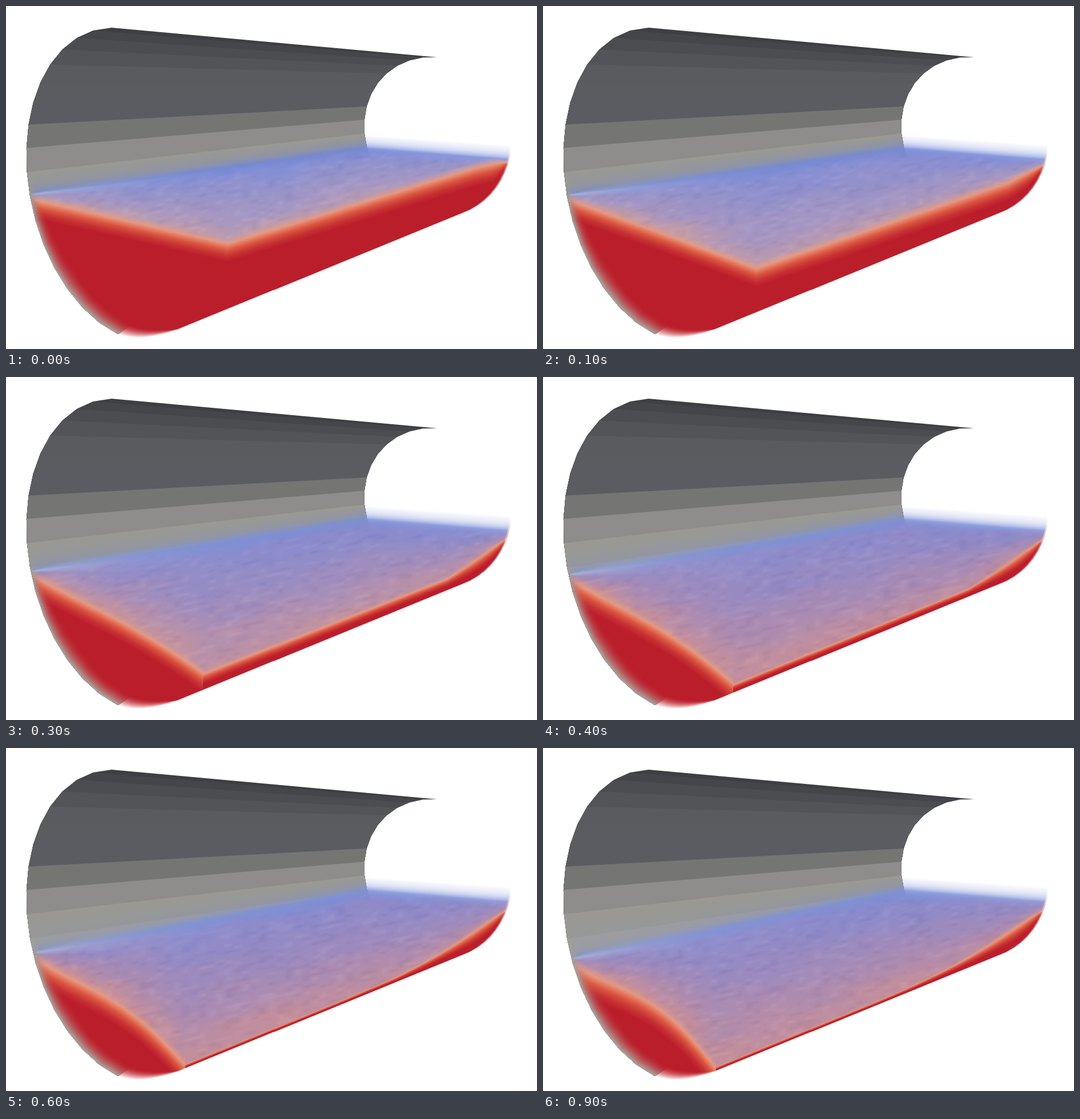
These frames come from a looping animation (930 px wide and 602 px high, 0.95 s). A matplotlib script:

```python
import numpy as np
import matplotlib.pyplot as plt
from matplotlib.animation import FuncAnimation
from matplotlib.colors import to_rgb
from matplotlib.path import Path

W, H, TOP = 930, 602, 220
FRAMES, STEP = 19, 50
FACETS = 17

X, Y = np.meshgrid(np.arange(W) + 0.5, np.arange(TOP, H) + 0.5)
x = X[0]


def ramp(value, stops, colors):
    rgb = np.array([to_rgb(c) for c in colors])
    return np.stack([np.interp(value, stops, rgb[:, i]) for i in range(3)], -1)


def smooth(v):
    v = np.clip(v, 0, 1)
    return v * v * (3 - 2 * v)


def lerp(a, b, w):
    return a + (b - a) * w


def mix(a, b, w):
    return lerp(a, b, w[..., None])


def half_circle(center, up, side, depth):
    """Corners of a half circle seen in perspective, from top to bottom."""
    a = np.linspace(0, np.pi, FACETS + 1)[:, None]
    arc = np.array(up) * np.cos(a) + np.array(side) * np.sin(a)
    return np.array(center) + arc / (1 + depth * np.sin(a))


def bezier(p, q, r):
    t = np.linspace(0, 1, 9)[:, None]
    p, q, r = map(np.array, (p, q, r))
    return p * (1 - t) ** 2 + 2 * q * t * (1 - t) + r * t ** 2


def noise(rng, a, b):
    """Smooth value noise in -1..1 at the grid coordinates a, b."""
    grid = rng.uniform(-1, 1, (128, 128))
    i, j = np.floor(a).astype(int), np.floor(b).astype(int)
    u, v = smooth(a - i), smooth(b - j)
    i0, i1, j0, j1 = i % 128, (i + 1) % 128, j % 128, (j + 1) % 128
    low = lerp(grid[i0, j0], grid[i1, j0], u)
    high = lerp(grid[i0, j1], grid[i1, j1], u)
    return lerp(low, high, v)


near = half_circle((190.5, 307), (-5.5, -269), (-181, -43), 0.17)
far = half_circle((756, 232), (-1, -142), (-139, -22), 0.08)

# Outer edge of the liquid: near rim, straight underside, far end
underside = np.vstack([bezier(near[-1], (235, 592), (300, 568)),
                       bezier((812, 358), (868, 330), (883, 262))])
edge = np.vstack([near[9:], underside, [(884, 244)]])
BOTTOM = np.interp(x, underside[:, 0], underside[:, 1])
HALO_TOP = np.interp(x, [36, 627, 884], [290, 226, 244])


def edge_distance():
    best = np.full(X.shape, 1e9)
    for (x0, y0), (x1, y1) in zip(edge, edge[1:]):
        dx, dy = x1 - x0, y1 - y0
        length = max(dx * dx + dy * dy, 1e-9)
        s = np.clip(((X - x0) * dx + (Y - y0) * dy) / length, 0, 1)
        best = np.minimum(best, np.hypot(X - x0 - s * dx, Y - y0 - s * dy))
    shape = Path(np.vstack([edge, [(627, 226)]]))
    inside = shape.contains_points(np.column_stack([X.ravel(), Y.ravel()]))
    return best * inside.reshape(X.shape)


FADE = np.interp(x, [40, 120, 200, 300, 800, 884], [14, 30, 28, 1.2, 1.2, 6])
EDGE_ALPHA = 1 - (1 - np.clip(edge_distance() / FADE, 0, 1)) ** 2


def front_line(s, cx):
    """Liquid level along the two cut faces, which meet at column cx."""
    late = smooth(s)
    cy = lerp(566, 420, (1 - s) ** 3)
    left, right = lerp(343, 382, late), lerp(280, 273, (1 - s) ** 6)
    kx = lerp(820, 635, late)
    ky = np.interp(kx, x, BOTTOM) - lerp(7, 66, (1 - s) ** 4)
    y = np.interp(x, [48, cx, kx, 882], [left, cy, ky, right])
    u = np.clip((x - 48) / (cx - 48), 0, 1)
    r = np.clip((x - kx) / (882 - kx), 0, 1)
    y += late * (9 * np.sin(np.pi * r) - 32 * np.sin(np.pi * u ** 1.4))
    return np.minimum(y, BOTTOM - 6)


def liquid(n):
    s = n / (FRAMES - 1)
    late = smooth(s)
    rng = np.random.default_rng(40 + n)
    cx = lerp(388, 303, np.sin(np.pi / 2 * s))
    front = front_line(s, cx)
    back = np.interp(x, [45, 627, 884], [lerp(330, 370, late), 249, 270])

    # Free surface
    tilt = Y + 0.22 * X
    broad = noise(rng, X / 80, tilt / 22)
    fine = noise(rng, X / 15, tilt / 6)
    v = (Y - back) / np.maximum(front - back, 8)
    shown = np.clip(v * 6, 0, 1)
    tone = np.clip(v, 0, 1) + 0.07 * broad * shown
    tone += 0.35 * np.exp(-np.maximum(X - 48, 0) / 170) * shown
    stops = [0, .12, .4, .7, 1]
    rgb = lerp(
        ramp(tone, stops, ["#6f86da", "#828dd5", "#9593ca", "#a597c3", "#bf9caa"]),
        ramp(tone, stops, ["#7b8fd9", "#8c8aca", "#978ac1", "#ab8bb1", "#c28e9c"]),
        smooth(2 * s))
    spots = np.sign(fine) * np.clip(np.abs(fine) - 0.25, 0, 1)
    rgb += (spots * shown)[..., None] * [.04, .04, .025]
    pale = np.exp(-np.maximum(X - 48, 0) / 110) * np.clip(1 - 5 * np.abs(v - .05), 0, 1)
    rgb = mix(rgb, np.array(to_rgb("#bccbea")), 0.75 * pale)

    # Cut faces: warm rim that deepens to red
    band = lerp(28, 36, late)
    room = np.clip((BOTTOM - front) * 0.6, 3, band)
    e = (Y - front) / np.where(x < cx, band, room)
    face = ramp(e, [-.1, .08, .35, .7, 1.05],
                ["#e59a82", "#e67c62", "#d9543f", "#c73133", "#bb1e2b"])
    face = mix(face, np.array(to_rgb("#cf4a43")), 0.6 * (1 - EDGE_ALPHA) * (X < 300))
    rgb = mix(rgb, face, smooth((e + .55) / .6))

    # Thin haze above the back edge
    gap = Y - back
    rise = np.clip((Y - HALO_TOP) / (back - HALO_TOP), 0, 1)
    haze = (.68 * np.exp(np.minimum(gap, 0) / 8) + .14 * rise)
    haze *= np.clip((Y - HALO_TOP) / 4, 0, 1)
    alpha = np.where(gap < 0, haze, 1 - .18 * np.exp(-np.maximum(gap, 0) / 5))
    rgba = np.dstack([rgb, alpha * EDGE_ALPHA])
    return (np.clip(rgba, 0, 1) * 255 + .5).astype(np.uint8)


fig = plt.figure(figsize=(W / 100, H / 100), dpi=100, facecolor="white")
ax = fig.add_axes([0, 0, 1, 1])
ax.axis("off")

# Each facet reaches down to the bottom and is overlaid by the next
shades = ramp(np.arange(12), [0, 4, 6, 7, 8, 9, 11],
              ["#3e3f42", "#5a5b5f", "#5b5c61", "#757673", "#8e8d8b", "#9a9993", "#a8a59e"])
for i, shade in enumerate(shades):
    outline = np.vstack([near[i:], far[i:12][::-1]])
    ax.fill(outline[:, 0], outline[:, 1], color=shade, lw=0, zorder=1 + i / 20)

layer = ax.imshow(liquid(0), extent=(0, W, H, TOP), aspect="auto",
                  interpolation="nearest", zorder=3)
ax.set_xlim(0, W)
ax.set_ylim(H, 0)


def update(n):
    layer.set_data(liquid(n))
    return [layer]


anim = FuncAnimation(fig, update, frames=FRAMES, interval=STEP,
                     repeat=True, repeat_delay=0, blit=False)
plt.show()
```
